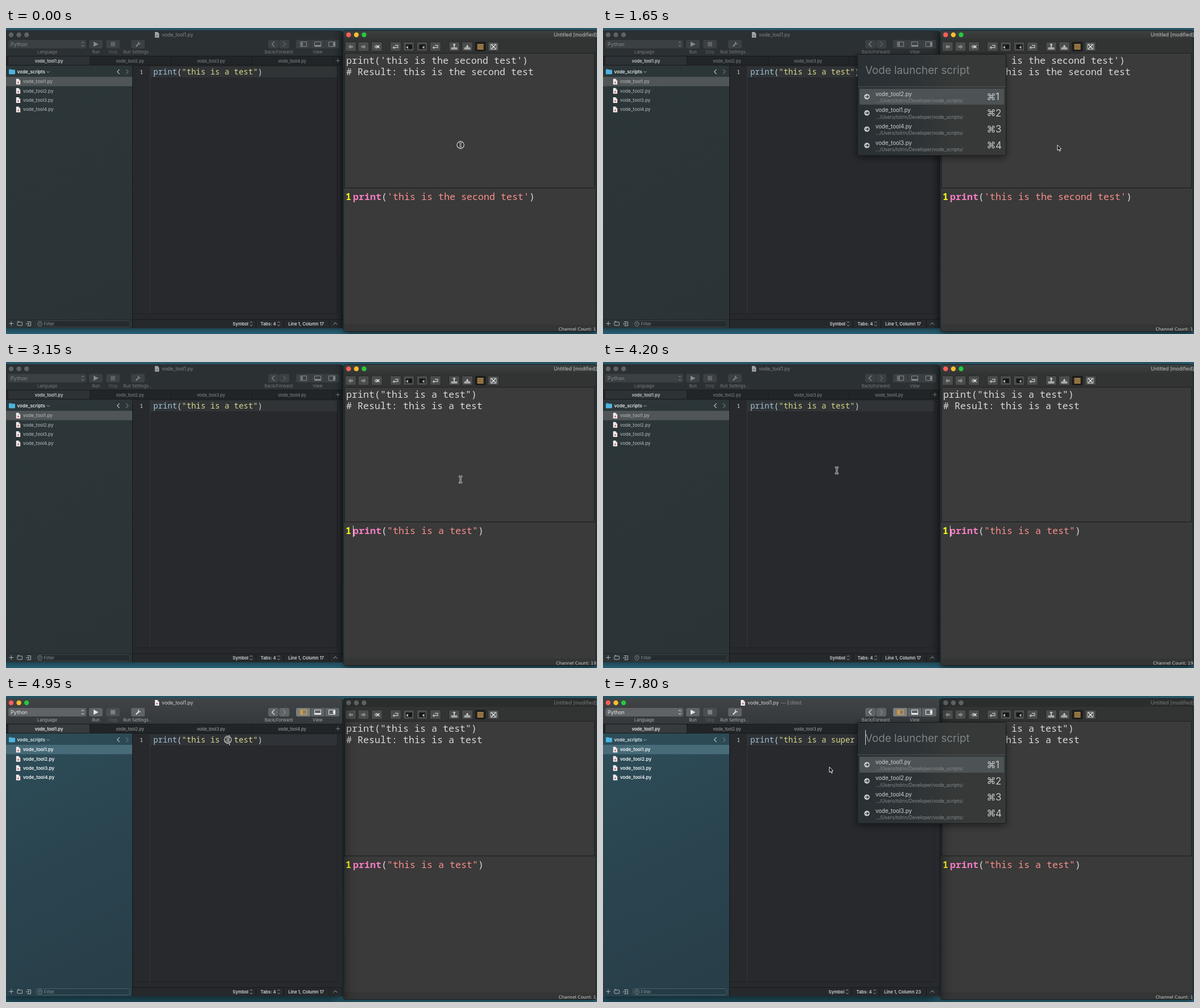
Recreate the animation shown at these times as an HTML page with a canvas. Size 1039 by 539 pixels, loop 8 s.

```html
<!DOCTYPE html>
<html lang="en">
<head>
<meta charset="utf-8">
<title>Launcher demo</title>
<style>
html, body { margin: 0; width: 100%; height: 100%; overflow: hidden; background: #2a5f72; }
canvas { display: block; }
</style>
</head>
<body>
<canvas id="stage" width="1039" height="539"></canvas>
<script>
const ctx = document.getElementById('stage').getContext('2d');
const LOOP = 8000;
const UI = 'Inter, sans-serif', MONO = '"Noto Sans Mono", monospace', QT = '"DejaVu Sans", sans-serif';
const LIGHTS = ['#ff5f57', '#febc2e', '#28c840'];
const file = n => `vode_tool${n}.py`;

// Held values: [start time, value]
const CURSOR = [
  [0, ['click', 799, 206]], [150, ['beam', 799, 207]], [600, ['arrow', 799, 206]],
  [2400, ['beam', 799, 207]], [3900, ['beam', 735, 206]], [4050, ['beam', 540, 199]],
  [4200, ['beam', 411, 191]], [4350, ['beam', 385, 162]], [4500, ['beam', 342, 112]],
  [4650, ['beam', 306, 79]], [4800, ['click', 304, 77]], [4950, ['click', 390, 77]],
  [5100, ['beam', 390, 77]], [5700, ['beam', 391, 84]], [5850, ['beam', 394, 102]],
  [6000, ['beam', 397, 118]], [6150, ['beam', 399, 126]], [7500, ['arrow', 398, 125]]
];
const TYPED = [[0, ''], [6300, ' '], [6450, ' s'], [6600, ' su'], [6750, ' supe'], [6900, ' super']];
const BLINK = [[0, false], [1050, true], [1650, false], [2100, true], [3150, true], [3600, false],
  [4200, true], [7500, false], [7800, true]];

const held = (keys, t) => keys.reduce((v, k) => t >= k[0] ? k[1] : v, keys[0][1]);
const within = (t, a, b) => t >= a && t < b;

function rect(x, y, w, h, fill, r = 0) {
  ctx.fillStyle = fill;
  ctx.beginPath();
  ctx.roundRect(x, y, w, h, r);
  ctx.fill();
}
function shadowed(x, y, w, h, fill, r, blur, drop, alpha) {
  ctx.save();
  ctx.shadowColor = `rgba(0,0,0,${alpha})`;
  ctx.shadowBlur = blur;
  ctx.shadowOffsetY = drop;
  rect(x, y, w, h, fill, r);
  ctx.restore();
}
function frame(x, y, w, h, color, r = 0, lw = 1) {
  ctx.strokeStyle = color;
  ctx.lineWidth = lw;
  ctx.beginPath();
  ctx.roundRect(x, y, w, h, r);
  ctx.stroke();
}
function dot(x, y, r, fill) {
  ctx.fillStyle = fill;
  ctx.beginPath();
  ctx.arc(x, y, r, 0, 7);
  ctx.fill();
}
function line(color, lw, ...p) {
  ctx.strokeStyle = color;
  ctx.lineWidth = lw;
  ctx.beginPath();
  for (let i = 0; i < p.length; i += 2) ctx.lineTo(p[i], p[i + 1]);
  ctx.stroke();
}
function poly(fill, ...p) {
  ctx.fillStyle = fill;
  ctx.beginPath();
  for (let i = 0; i < p.length; i += 2) ctx.lineTo(p[i], p[i + 1]);
  ctx.fill();
}
function fade(x0, y0, x1, y1, ...colors) {
  const g = ctx.createLinearGradient(x0, y0, x1, y1);
  colors.forEach((c, i) => g.addColorStop(i / (colors.length - 1), c));
  return g;
}
// y is the middle of the capitals; returns the x after the text
function text(s, x, y, size, color, { font = UI, weight = 400, align = 'left' } = {}) {
  ctx.font = `${weight} ${size}px ${font}`;
  ctx.textAlign = align;
  ctx.fillStyle = color;
  ctx.fillText(s, x, y + size * 0.35);
  return x + ctx.measureText(s).width;
}
function runs(x, y, size, ...parts) {
  for (const [s, color, weight = 500] of parts) x = text(s, x, y, size, color, { font: MONO, weight });
}
function chevrons(x, y, c) {
  line(c, 1, x - 2.2, y - 1.5, x, y - 4, x + 2.2, y - 1.5);
  line(c, 1, x - 2.2, y + 1.5, x, y + 4, x + 2.2, y + 1.5);
}
function page(x, y, on) {
  const paper = on ? '#f0f0f0' : '#a4a6a7';
  poly(paper, x - 3.7, y - 5, x + 1, y - 5, x + 3.7, y - 2, x + 3.7, y + 5, x - 3.7, y + 5);
  poly('#8d8f90', x + 1, y - 5, x + 3.7, y - 2, x + 1, y - 2);
  dot(x, y + 1.5, 1.7, on ? '#d8707c' : '#77797a');
}
function lights(x, on) {
  LIGHTS.forEach((c, i) => dot(x + i * 13.6, 12, 4.2, on ? c : '#5f6264'));
}

function toolbar(on, edited) {
  const ink = on ? '#e4e6e7' : '#85898b', label = on ? '#a9adaf' : '#787c7e';
  const btn = on ? '#606365' : '#3b4042';
  rect(0, 4, 591, 46, on ? fade(0, 4, 0, 50, '#404446', '#34383a') : '#2b3033', 4);
  lights(9, on);
  const tx = edited ? 254 : 274;
  page(edited ? 246 : 265.5, 12, on);
  const end = text(file(1), tx, 12, 8.6, on ? '#d5d7d8' : '#85898b');
  if (edited) text('— Edited', end + 3.5, 12, 8.6, '#888c8e');

  rect(4, 21, 137, 15, btn, 3);
  text('Python', 8, 28.8, 9, ink);
  chevrons(135, 28.5, ink);
  for (const x of [146, 176, 220]) rect(x, 21, 24, 15, x === 176 && on ? '#4a4e50' : btn, 3);
  poly(ink, 154, 24, 162.5, 28.5, 154, 33);
  rect(184, 24.5, 8, 8, on ? '#7c8082' : '#5e6264');
  line(ink, 2, 228.5, 32.5, 233, 28);
  line(ink, 1.4, 236.5, 27.5, 233.5, 28, 232.5, 26.5, 233.5, 24);
  rect(461, 21, 18, 15, btn, 3);
  rect(480, 21, 18, 15, btn, 3);
  line(ink, 1.2, 472, 24, 467.5, 28.5, 472, 33);
  line(on ? '#85898b' : '#5e6264', 1.2, 487, 24, 491.5, 28.5, 487, 33);
  rect(510, 21, 76, 15, btn, 3);
  if (on) rect(510, 21, 25, 15, '#7b7e80', 3);
  line('#303436', 1, 535.5, 21, 535.5, 36);
  line('#303436', 1, 560.5, 21, 560.5, 36);
  [523, 548, 573].forEach((x, i) => {
    const c = on && !i ? '#f5a623' : ink;
    frame(x - 5.5, 24.5, 11, 8, c);
    if (i === 0) rect(x - 4, 25.5, 2.5, 6, c);
    if (i === 1) rect(x - 5, 30, 10, 2.5, c);
    if (i === 2) rect(x + 2, 25.5, 3, 6, c);
  });
  for (const [s, x] of [['Language', 72.5], ['Run', 158], ['Stop', 188], ['Run Settings...', 231.5],
    ['Back/Forward', 479.5], ['View', 548]])
    text(s, x, 42.3, 7.5, s === 'Stop' ? '#5f6365' : label, { align: 'center' });
}

function tabs(on) {
  rect(0, 50, 591, 17, '#222527');
  rect(4, 50, 143, 16, on ? '#363b3d' : '#2c3235');
  line('#17191a', 1, 0, 49.5, 591, 49.5);
  line('#17191a', 1, 0, 65.5, 591, 65.5);
  for (const x of [3.5, 147.5, 290.5, 432.5, 575.5]) line('#1a1d1e', 1, x, 50, x, 66);
  [75.5, 218, 360.5, 503].forEach((x, i) => text(file(i + 1), x, 58, 7.5,
    i ? (on ? '#a6aaac' : '#888c8e') : (on ? '#eceeef' : '#c6cacb'),
    { align: 'center', weight: i ? 400 : 600 }));
  line('#777b7d', 1, 580, 57.5, 587, 57.5);
  line('#777b7d', 1, 583.5, 54, 583.5, 61);
}

function sidebar(on) {
  rect(0, 66, 222, 463, on ? fade(0, 67, 222, 529, '#2d4d59', '#2a444f', '#283e48')
    : fade(0, 67, 222, 529, '#2c3639', '#2b3336'));
  rect(5, 72.5, 5, 3, '#3aa0cf', 1);
  rect(5, 73.5, 11, 8, '#4db4de', 1);
  text('vode_scripts', 19.5, 77, 8, '#e2e6e7', { weight: 600 });
  line('#a8b0b2', 1, 71.5, 76, 74, 78.5, 76.5, 76);
  line('#b4bbbd', 1.1, 199.5, 73, 195.5, 77, 199.5, 81);
  line('#6b7578', 1.1, 211, 73, 215, 77, 211, 81);
  rect(0, 86, 222, 16.5, on ? '#476b78' : '#505557');
  for (let i = 0; i < 4; i++) {
    const y = 94.5 + i * 16.3;
    page(21.5, y, true);
    text(file(i + 1), 30, y, 8.1, on ? '#f0f3f4' : '#b9bfc1', { weight: on ? 600 : 400 });
  }
  line(on ? '#24404a' : '#23292b', 1, 0, 513.5, 222, 513.5);
  const ink = '#aeb6b8';
  line(ink, 1, 5.5, 520.5, 13, 520.5);
  line(ink, 1, 9.2, 516.7, 9.2, 524.3);
  frame(20, 518, 8.5, 6, ink, 1);
  line(ink, 1, 20, 517, 23.5, 517);
  line(ink, 1, 37, 517.5, 43.5, 517.5, 43.5, 524.5, 37, 524.5);
  line(ink, 1, 35, 521, 41, 521);
  line(ink, 1, 39, 519, 41, 521, 39, 523);
  rect(52, 515, 166, 12, on ? '#243c46' : '#252c2f', 3);
  frame(52.5, 515.5, 165, 11, on ? '#4b626c' : '#3b4245', 3);
  frame(55.5, 517, 8, 8, '#8a9497', 4, 0.9);
  line('#8a9497', 0.9, 57.5, 520, 61.5, 520);
  line('#8a9497', 0.9, 58.5, 522, 60.5, 522);
  text('Filter', 66.5, 521, 7.8, '#869093');
}

function editor(on, typed, column, caret) {
  rect(222, 66, 369, 463, '#27292d');
  line('#141617', 1, 222.5, 66, 222.5, 529);
  rect(253, 68, 329, 19, on ? '#2f3236' : '#303436');
  line('#33363a', 1, 253.5, 67, 253.5, 503);
  line('#1f2124', 1, 223, 503.5, 582, 503.5);
  line('#1f2124', 1, 582.5, 67, 582.5, 503);
  text('1', 238, 78, 9.5, '#dfe1e2', { align: 'center', font: MONO, weight: 500 });
  runs(259, 77.6, 13.92, ['print', '#9fc0d6'], ['(', '#c9d0d4'],
    [`"this is a${typed} test"`, '#d6d488'], [')', '#c9d0d4']);
  if (caret) rect(258.6 + (column - 1) * 8.352, 69, 1, 18, '#e8e8e8');

  rect(223, 513, 368, 16, '#26292c');
  line('#17191a', 1, 223, 513.5, 591, 513.5);
  const opts = { weight: 600 }, ink = '#d2d5d7';
  const label = `Line 1, Column ${column}`;
  ctx.font = `600 7.6px ${UI}`;
  const shift = ctx.measureText('Line 1, Column 17').width - ctx.measureText(label).width;
  text(label, 559, 521, 7.6, ink, { ...opts, align: 'right' });
  text('Symbol', 398.5 + shift, 521, 7.6, ink, opts);
  text('Tabs: 4', 447.5 + shift, 521, 7.6, ink, opts);
  chevrons(431 + shift, 521, '#989c9e');
  chevrons(479.5 + shift, 521, '#989c9e');
  for (const x of [439.5 + shift, 488.5 + shift, 568.5]) line('#151718', 1, x, 515, x, 528);
  line('#a5a9ab', 1, 575.5, 522.5, 579, 519, 582.5, 522.5);
}

const arrowIcon = (x, y, d, c) => {
  poly(c, x - 4 * d, y, x, y - 4, x, y + 4);
  rect(x - (d > 0 ? 0 : 4), y - 1.5, 4, 3, c);
};
const returnIcon = (x, y) => {
  line('#bcbcbc', 1.3, x - 3, y + 1.5, x + 4, y + 1.5, x + 4, y - 2.5, x - 1, y - 2.5);
  poly('#bcbcbc', x - 5.5, y + 1.5, x - 2, y - 1.2, x - 2, y + 4.2);
};
const crossIcon = (x, y, c, r = 2.5) => {
  line(c, 1.4, x - r, y - r, x + r, y + r);
  line(c, 1.4, x + r, y - r, x - r, y + r);
};
const trayIcon = (x, y, d) => {
  rect(x - 5.5, y + 1, 11, 4, '#a8a8a8', 1);
  poly('#c4c4c4', x - 3, y - 2 - d, x + 3, y - 2 - d, x, y - 2 - 4 * d);
  rect(x - 1, y - 3, 2, 4, '#c4c4c4');
};
const blockIcon = (x, y, dx) => {
  rect(x - 5, y - 4, 11, 8, '#161616');
  poly('#b0b0b0', x + dx - 4, y + 1, x + dx, y - 2, x + dx, y + 4);
};
const TOOLS = [
  [606, (x, y) => arrowIcon(x, y, 1, '#8d8d8d')],
  [628.5, (x, y) => arrowIcon(x, y, -1, '#8d8d8d')],
  [652, (x, y) => { arrowIcon(x - 1, y, 1, '#8d8d8d'); crossIcon(x + 2, y, '#e6e6e6'); }],
  [685, returnIcon],
  [708, (x, y) => blockIcon(x, y, -1)],
  [731.5, (x, y) => blockIcon(x, y, 4)],
  [755, returnIcon],
  [788, (x, y) => trayIcon(x, y, 1)],
  [811, (x, y) => trayIcon(x, y, -1)],
  [834, (x, y) => {
    rect(x - 5.5, y - 5, 11, 10, '#b08a4e');
    for (let i = -3; i <= 3; i += 2) line('#5d4a2b', 0.8, x - 5.5, y + i, x + 5.5, y + i);
  }],
  [857, (x, y) => { frame(x - 5, y - 4.5, 10, 9, '#c8c8c8'); crossIcon(x, y, '#f0f0f0', 3.5); }]
];

function scriptWindow(on, s) {
  shadowed(593, 4, 445, 531, '#1d2020', 4, 14, 5, on ? 0.6 : 0.4);
  rect(594, 5, 443, 14, on ? fade(0, 5, 0, 19, '#3d4040', '#343636') : '#2b2d2d', 3);
  lights(602.3, on);
  text('Untitled [modified]', 963, 12, 8.6, on ? '#c4c6c6' : '#7b7d7d');
  rect(594, 19, 443, 515, '#323333');
  TOOLS.forEach(([x, icon], i) => {
    const down = i === 9 || (i === 3 && s.running);
    rect(x - 9.5, 24.5, 19, 16.5, down ? '#1c1c1c' : '#4b4c4c', 2);
    frame(x - 9.5, 24.5, 19, 16.5, '#262727', 2);
    icon(x, 33);
  });
  rect(595, 44, 440, 238, '#3a3b3a');
  frame(595.5, 44.5, 439, 237, '#1f2020');
  rect(594, 283, 442, 239, '#393a39');
  rect(594, 522, 443, 12, '#343535');
  if (s.output) {
    runs(598, 57, 16.67, [`print(${s.output})`, '#d8d9d8']);
    runs(598, 77, 16.67, [`# Result: ${s.output.slice(1, -1)}`, '#d8d9d8']);
  }
  if (s.selected) rect(610, 288, 422, 20.5, '#5b5c5b');
  runs(597, 297.5, 16.67, ['1', '#f6f31c', 700]);
  runs(610, 297.5, 16.67, ['print', '#f57cc3', 700], ['(', '#d8d9d8'], [s.source, '#fa8e8e'], [')', '#d8d9d8']);
  if (s.caret) rect(610, 288, 1, 20.5, '#d8d8d8');
  text(s.count, s.count.endsWith('19') ? 967 : 971.5, 530, 7.6, '#cfd0cf', { font: QT });
}

function launcher(order, row, caret, alpha) {
  shadowed(447, 46, 261, 178, fade(447, 0, 708, 0, '#2a3033', '#2c3235', '#363938', '#363938'), 1, 14, 4, 0.5);
  frame(447.5, 46.5, 261, 178, '#181b1c', 1);
  text('Vode launcher script', 461, 74, 18.8, '#7e8486');
  line('#4d5254', 1, 448, 103.5, 708, 103.5);
  rect(451, 107 + row * 28.6, 254, 28, '#4d5254', 1);
  if (caret) rect(461, 60, 1, 26, '#d5d8d9');
  ctx.globalAlpha = alpha;
  order.forEach((n, i) => {
    const y = 121 + i * 28.6;
    dot(464, y, 4.8, '#c6cacb');
    line('#2c3234', 1.3, 461.2, y, 466, y);
    line('#2c3234', 1.3, 464.2, y - 2.2, 466.5, y, 464.2, y + 2.2);
    text(file(n), 479, y - 4.6, 9.7, '#cfd3d4');
    text('.../Users/tolrin/Developer/vode_scripts/', 479, y + 7, 8.3, '#868c8e');
    text('⌘', 674.5, y, 16, '#c3c7c8');
    text(String(i + 1), 690, y, 17, '#c3c7c8');
  });
  ctx.globalAlpha = 1;
}

function pointer([kind, x, y]) {
  if (kind === 'arrow') {
    const p = [x, y, x, y + 9.5, x + 2.2, y + 7.6, x + 3.8, y + 11, x + 5.4, y + 10.2, x + 3.9, y + 7, x + 6.6, y + 6.8, x, y];
    poly('#0a0a0a', ...p);
    line('#f2f2f2', 1, ...p);
    return;
  }
  if (kind === 'click') {
    dot(x, y, 6.5, 'rgba(30,32,32,.35)');
    frame(x - 6.2, y - 6.2, 12.4, 12.4, '#e4e4e4', 6.2, 1.1);
  }
  for (const [c, w] of [['#e8e8e8', 2.8], ['#111', 1]]) {
    line(c, w, x, y - 5, x, y + 5);
    line(c, w, x - 3, y - 6, x, y - 4.5, x + 3, y - 6);
    line(c, w, x - 3, y + 6, x, y + 4.5, x + 3, y + 6);
  }
}

function draw(t) {
  const editing = t >= 4800;
  const typed = held(TYPED, t);
  const open = within(t, 600, 2700) || t >= 7500;
  const blink = held(BLINK, t);
  const first = '"this is a test"', second = "'this is the second test'";

  rect(0, 0, 1039, 539, fade(0, 0, 0, 539, '#2a5c6d', '#265b6d', '#2a6579'));
  const script = () => scriptWindow(!editing, {
    output: t < 2700 ? second : t < 3000 ? '' : first,
    source: t < 2850 ? second : first,
    selected: within(t, 2700, 3000),
    running: within(t, 2700, 3150),
    caret: within(t, 3150, 4800) && blink,
    count: within(t, 3150, 4800) ? 'Channel Count: 19' : 'Channel Count: 1'
  });
  const code = () => {
    shadowed(-10, 4, 601, 525, '#27292d', 4, editing ? 24 : 12, editing ? 10 : 4, editing ? 0.65 : 0.4);
    toolbar(editing, typed !== '');
    tabs(editing);
    sidebar(editing);
    const column = within(t, 4800, 4950) ? 6 : 17 + typed.length;
    editor(editing, typed, column, editing && !open);
    line('#15191b', 1, 591.5, 6, 591.5, 529);
  };
  if (editing) {
    script();
    code();
  } else {
    code();
    rect(576, 5, 16, 524, fade(576, 0, 592, 0, 'rgba(0,0,0,0)', 'rgba(0,0,0,.15)'));
    script();
  }
  if (open) {
    const late = t >= 7500;
    const settling = within(t, 600, 1050) || within(t, 7500, 7650);
    launcher(late ? [1, 2, 4, 3] : [2, 1, 4, 3], within(t, 2100, 2700) ? 1 : 0, blink, settling ? 0.8 : 1);
  }
  pointer(held(CURSOR, t));
}

const start = performance.now();
function tick() {
  draw((performance.now() - start) % LOOP);
  requestAnimationFrame(tick);
}
tick();
</script>
</body>
</html>
```
